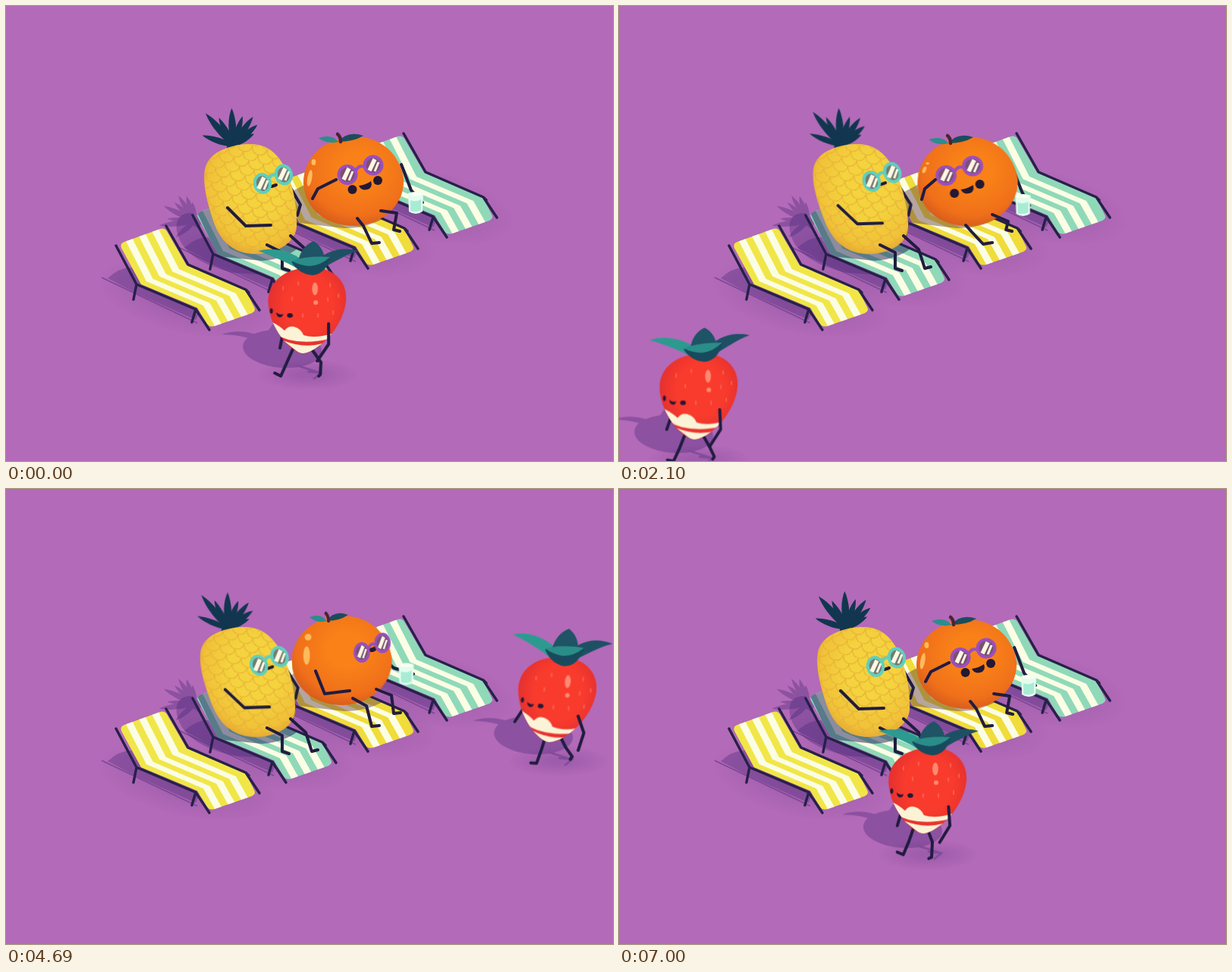
Recreate the animation shown at these times as an HTML page without scripts. Size 800 by 600 pixels, loop 7070 ms.

```html
<!DOCTYPE html>
<html lang="en">
<head>
<meta charset="utf-8">
<title>Fruit on the beach</title>
<style>
html, body { margin: 0; width: 100%; height: 100%; overflow: hidden; background: #b36ab8; }
svg { display: block; width: 100vw; height: 100vh; }
.limb { fill: none; stroke: #211c40; stroke-width: 4; stroke-linecap: round; stroke-linejoin: round; }
.rail { fill: none; stroke: #272049; stroke-width: 3.4; stroke-linecap: round; stroke-linejoin: round; }
.shade { fill: #4a2878; opacity: .36; }

/* everything slow shares one loop */
.loop { animation: 7070ms ease-in-out infinite; }

/* pineapple */
.sway { animation-name: sway; transform-origin: 330px 322px; }
.crown { animation-name: crown; transform-origin: 300px 189px; }
.lift { animation-name: lift; }
@keyframes sway {
  0%, 99%, 100% { transform: skewX(0deg); }
  13.9%, 29.7% { transform: skewX(3.2deg); }
  39.6%, 55.4% { transform: skewX(1.4deg); }
  76.2% { transform: skewX(4.5deg); }
}
@keyframes crown {
  0%, 99%, 100% { transform: rotate(0deg); }
  13.9% { transform: rotate(8deg) scaleY(.93); }
  29.7% { transform: rotate(3deg); }
  39.6% { transform: rotate(0deg) scaleY(1.03); }
  55.4% { transform: rotate(4deg) scaleY(.96); }
  76.2% { transform: rotate(6deg) scaleY(.98); }
}
@keyframes lift {
  0%, 39.6%, 55.4%, 99%, 100% { transform: translateY(0); }
  13.9%, 29.7%, 76.2% { transform: translateY(-2.8px); }
}

/* orange */
.peel { animation-name: peel; }
.stem { animation-name: stem; transform-origin: 441px 176px; }
.gleam { animation-name: gleam; transform-origin: 401px 222px; }
.face { animation-name: face; transform-origin: 473px 236px; }
.specs { animation-name: specs; transform-origin: 467px 216px; }
.cup { animation-name: cup; }
.arm-l { animation-name: armL; }
.arm-r { animation-name: armR; }
.leg-l { animation-name: legL; }
.leg-r { animation-name: legR; }
@keyframes peel {
  0%, 92%, 100% { transform: translate(0, 0); }
  13.9% { transform: translate(-2px, 0); }
  29.7% { transform: translate(1.5px, .5px); }
  39.6% { transform: translate(-6px, -2px); }
  50%, 78% { transform: translate(-15.5px, -5px); }
}
@keyframes stem {
  0%, 92%, 100% { transform: translate(0, 0); }
  13.9% { transform: translate(-5px, 3px); }
  29.7% { transform: translate(-4px, 2px); }
  39.6% { transform: translate(-9px, -2px); }
  50%, 78% { transform: translate(-16px, -5px) scaleX(.86); }
}
@keyframes gleam {
  0%, 92%, 100% { transform: translate(0, 0) scaleX(.75); }
  13.9% { transform: translate(-2px, 0) scale(.5, .8); }
  29.7% { transform: translate(2px, -8px) scale(.6, .4); }
  39.6% { transform: translate(-3px, -4px) scaleX(.9); }
  50%, 78% { transform: translate(-5px, -8px) rotate(-14deg) scale(1.1); }
}
@keyframes face {
  0%, 92%, 100% { transform: translate(0, 0); }
  13.9% { transform: translate(-12px, 4.5px); }
  29.7% { transform: translate(-14.5px, 5px); }
  39.6% { transform: translate(-4px, -10px); }
  50%, 78% { transform: translate(9px, -26px) scale(.76); }
}
@keyframes specs {
  0%, 92%, 100% { transform: translate(0, 0); }
  13.9% { transform: translate(-14px, 2.5px) scaleX(1.04); }
  29.7% { transform: translate(-18.5px, 1px) scaleX(1.03); }
  39.6% { transform: translate(2px, 9.5px); }
  50%, 78% { transform: translate(15.5px, -7px) scaleX(.8); }
}
@keyframes cup {
  0%, 92%, 100% { transform: translate(540px, 260px); }
  13.9% { transform: translate(533.5px, 262px); }
  29.7% { transform: translate(532.5px, 263px); }
  39.6% { transform: translate(534px, 257.5px); }
  50%, 78% { transform: translate(527.5px, 244.5px); }
}
@keyframes armL {
  0%, 92%, 100% { d: path("M404 254L411 241L435 229"); }
  13.9% { d: path("M397 257L402 243L423 230"); }
  29.7% { d: path("M399 255L403 241L417 229"); }
  39.6% { d: path("M399 249L403 256L435 243"); }
  50%, 78% { d: path("M408 240L420 270L453 266"); }
}
@keyframes armR {
  0%, 92%, 100% { d: path("M521 209L534 243L549 259"); }
  13.9% { d: path("M517 211L531 246L543 262"); }
  29.7% { d: path("M518 212L531 245L541 263"); }
  39.6% { d: path("M514 206L523 238L543 253"); }
  50%, 78% { d: path("M500 226L511 236L537 244"); }
}
@keyframes legL {
  0%, 92%, 100% { d: path("M463 280L471 290L482 313L492 312"); }
  13.9%, 29.7% { d: path("M457 289L465 298L480 314L492 312"); }
  39.6% { d: path("M457 282L469 292L482 314L492 312"); }
  50%, 78% { d: path("M457 276L475 286L482 313L492 312"); }
}
@keyframes legR {
  0%, 92%, 100% { d: path("M494 270L515 273L511 295L519 297"); }
  13.9%, 29.7% { d: path("M492 275L513 284L510 295L518 297"); }
  39.6% { d: path("M494 267L512 275L511 296L519 296"); }
  50%, 78% { d: path("M488 264L508 272L511 296L520 295"); }
}

/* strawberry: a straight stroll across the stage, seven strides to a loop */
.stroll { animation: stroll 7070ms steps(101) -3710ms infinite; }
@keyframes stroll {
  from { transform: translate(913px, 191.5px); }
  to { transform: translate(-70px, 569.7px); }
}
.stride { animation: 1010ms linear infinite; }
.back { animation-delay: -505ms; }
.bob { animation-name: bob; }
.turn { animation-name: turn; }
.leaves { animation-name: leaves; transform-origin: 5px -50px; }
.leg { animation-name: leg; }
.near { animation-name: near; }
.far { animation-name: far; }
@keyframes bob {
  0%, 100% { transform: translate(0, 0) rotate(0deg); }
  10% { transform: translate(0, 1.5px) rotate(0deg); }
  28% { transform: translate(-2px, -5px) rotate(11deg); }
  35% { transform: translate(-2.5px, -5px) rotate(12deg); }
  50% { transform: translate(0, 0) rotate(3deg); }
  62% { transform: translate(-1px, 3px) rotate(5deg); }
  77% { transform: translate(-3px, 8px) rotate(4deg); }
  90% { transform: translate(0, 0) rotate(0deg); }
}
@keyframes turn {
  0%, 92%, 100% { transform: translate(0, 0); }
  34% { transform: translate(9px, 7px); }
  52% { transform: translate(3px, 2px); }
  77% { transform: translate(2px, 5px); }
}
@keyframes leaves {
  0%, 92%, 100% { transform: rotate(0deg); }
  34% { transform: translate(4px, 3px) rotate(-12deg); }
  55% { transform: rotate(-2deg); }
  77% { transform: rotate(4deg) scaleY(1.25); }
}
@keyframes leg {
  0%, 100% { d: path("M-18 60L-27 80L-35 98L-43 94"); }
  10% { d: path("M-17 60L-25 81L-33 98L-41 97"); }
  34% { d: path("M-10 56L-10 78L-11 104L-17 105"); }
  50% { d: path("M4 60L18 80L17 96L15 98"); }
  62% { d: path("M2 58L12 78L22 90L20 94"); }
  84% { d: path("M-20 58L-11 77L-13 92L-20 92"); }
  90% { d: path("M-18 58L-24 78L-31 95L-39 92"); }
}
@keyframes near {
  0%, 100% { d: path("M28 29L28 56L13 78"); }
  34% { d: path("M26 33L31 56L19 79"); }
  52% { d: path("M26 32L35 56L30 80"); }
  77% { d: path("M26 42L32 62L22 84"); }
}
@keyframes far {
  0%, 100% { d: path("M-28 30L-33 46L-36 61"); }
  34% { d: path("M-38 8L-49 21L-63 40"); }
  52% { d: path("M-38 8L-52 22L-65 38"); }
  77% { d: path("M-34 20L-42 34L-50 50"); }
}
</style>
</head>
<body>
<svg viewBox="0 0 800 600" preserveAspectRatio="none">
<defs>
  <radialGradient id="gold" cx=".58" cy=".38" r=".68">
    <stop offset=".4" stop-color="#f4d33e"/><stop offset=".8" stop-color="#f0c139"/><stop offset="1" stop-color="#e39c2d"/>
  </radialGradient>
  <radialGradient id="citrus" cx=".55" cy=".38" r=".66">
    <stop offset=".3" stop-color="#f98118"/><stop offset=".75" stop-color="#f0701a"/><stop offset="1" stop-color="#d4591d"/>
  </radialGradient>
  <radialGradient id="red" cx=".52" cy=".42" r=".62">
    <stop offset=".5" stop-color="#f93b2d"/><stop offset="1" stop-color="#dc2c30"/>
  </radialGradient>
  <radialGradient id="soft">
    <stop offset=".2" stop-color="#70408f" stop-opacity=".3"/><stop offset="1" stop-color="#70408f" stop-opacity="0"/>
  </radialGradient>
  <pattern id="scales" width="20" height="20" patternUnits="userSpaceOnUse" patternTransform="rotate(14)">
    <path d="M0 0Q1 10 10 10Q19 10 20 0M-10 10Q-9 20 0 20Q9 20 10 10Q11 20 20 20Q29 20 30 10" fill="none" stroke="#e8b135" stroke-width="1.1"/>
  </pattern>

  <!-- lounger cloth: one bent strip, repeated sideways -->
  <path id="cloth" d="M156 311L203 294Q209 292 212 297L238 342L311 372Q316 374 318 379L327 397Q330 402 324 405L275 422Q268 424 265 419L252 398L178 367L152 319Q150 313 156 311Z"/>
  <clipPath id="clothClip"><use href="#cloth"/></clipPath>
  <path id="stripe" d="M158 310l27 53 75 32 18 32 8.6-3.2-18-32-75-32-27-53z"/>
  <g id="stripes" clip-path="url(#clothClip)" fill="#fbfde4">
    <use href="#stripe"/>
    <use href="#stripe" x="17.2" y="-6.4"/>
    <use href="#stripe" x="34.4" y="-12.8"/>
  </g>
  <g id="ground">
    <ellipse cx="240" cy="385" rx="120" ry="48" fill="url(#soft)" transform="rotate(12 240 385)"/>
    <path class="shade" d="M134 359Q150 344 166 345L178 364L256 400L250 414L172 379Z"/>
    <path d="M126 358L252 418" stroke="#7d4796" stroke-width="1.6"/>
  </g>
  <g id="frame" class="rail">
    <path d="M145 316L172 367L250 400L268 427M172 367L168 387M250 400L245 417"/>
    <path d="M211 290L240 341L316 374L334 401M316 374L320 378"/>
  </g>

  <path id="blade" d="M-2 0C-8-18-6-40 0-52C5-40 7-18 2 0Z"/>
  <g id="tuft">
    <path d="M-10 4Q-7-8-11-16L11-16Q7-8 9 3Z"/>
    <g transform="translate(0 -6)">
      <use href="#blade" transform="rotate(-72) scale(.75 .83)"/>
      <use href="#blade" transform="rotate(-41) scale(.9 1.08)"/>
      <use href="#blade" transform="rotate(-28) scale(.75 .8)"/>
      <use href="#blade" transform="rotate(-3) scale(.95)"/>
      <use href="#blade" transform="rotate(17) scale(.75 .78)"/>
      <use href="#blade" transform="rotate(34) scale(.8 .88)"/>
      <use href="#blade" transform="rotate(49) scale(.8)"/>
      <use href="#blade" transform="rotate(60) scale(.7 .6)"/>
    </g>
  </g>
  <path id="pine" d="M320 182C345 181 360 196 370 218C380 242 384 270 383 292C380 316 352 327 328 327C300 326 283 312 273 283C265 258 259 236 262 216C266 194 292 183 320 182Z"/>
  <g id="glint" fill="none" stroke="#fff8e4"><path d="M-5 7L2-8" stroke-width="5.4"/><path d="M2 8L7-4" stroke-width="3"/></g>

  <path id="berry" d="M0-45C30-48 53-30 51-2C49 28 20 64-5 68C-20 68-46 40-51 8C-56-24-32-43 0-45Z"/>
  <clipPath id="berryClip"><use href="#berry"/></clipPath>
  <path id="seed" d="M0-2V2" stroke="#fc6350" stroke-width="1.8" stroke-linecap="round"/>
</defs>

<rect width="800" height="600" fill="#b36ab8"/>

<!-- shadows on the sand -->
<use href="#ground" x="313" y="-122"/>
<use href="#ground" x="209" y="-81"/>
<use href="#ground" x="101" y="-40"/>
<use href="#ground"/>
<path class="shade" d="M225 296Q222 272 246 273L272 327L336 354L300 352Q232 336 225 296Z"/>
<use href="#tuft" class="shade" transform="translate(254 286) rotate(-62) scale(.75 .92)"/>

<!-- loungers, far to near -->
<g transform="translate(313 -122)"><use href="#cloth" fill="#8fd9b9"/><use href="#stripes"/><use href="#frame"/></g>
<g transform="translate(209 -81)"><use href="#cloth" fill="#f0dc3a"/><use href="#stripes"/>
  <path clip-path="url(#clothClip)" fill="#552c40" opacity=".42" d="M160 330L215 300L296 356Q272 374 236 374L178 367Z"/><use href="#frame"/></g>
<g transform="translate(101 -40)"><use href="#cloth" fill="#8fd9b9"/><use href="#stripes"/>
  <path clip-path="url(#clothClip)" fill="#26285f" opacity=".52" d="M145 300L215 285L288 356Q268 374 236 376L178 370Z"/><use href="#frame"/></g>
<use href="#cloth" fill="#f1e648"/><use href="#stripes"/><use href="#frame"/>

<!-- orange -->
<g>
  <path class="limb loop arm-r" d="M521 209L534 243L549 259"/>
  <g class="loop peel">
    <path fill="url(#citrus)" d="M452 173C490 168 520 194 524 228C526 262 496 289 460 290C422 290 394 268 392 234C392 200 418 176 452 173Z"/>
  </g>
  <g class="loop stem">
    <path fill="#2b8d8c" d="M438 179Q430 168 412 174Q424 183 438 179Z"/>
    <path fill="#1c4c5c" d="M438 179Q450 164 471 171Q458 179 438 179Z"/>
    <path d="M441 179Q441 172 437 169" fill="none" stroke="#4b2433" stroke-width="4.5" stroke-linecap="round"/>
  </g>
  <g class="loop gleam" fill="#fdbb5c">
    <ellipse cx="400" cy="227" rx="4" ry="11" transform="rotate(14 400 227)"/><circle cx="407" cy="206" r="4"/>
  </g>
  <g class="loop face" fill="#241833">
    <circle cx="456.5" cy="242" r="6"/><circle cx="490" cy="230" r="6"/>
    <path d="M465 237Q474 236 481 231Q484 240 476 242Q468 244 465 237Z"/>
  </g>
  <g class="loop specs">
    <g fill="#79506f" stroke="#9a4fbd" stroke-width="4">
      <path d="M461 217Q466 208 474 213" fill="none"/>
      <circle cx="450" cy="222.5" r="11.5"/><circle cx="484" cy="210" r="11.5"/>
    </g>
    <use href="#glint" x="450" y="222"/><use href="#glint" x="484" y="210"/>
  </g>
  <path class="limb loop leg-l" d="M463 280L471 290L482 313L492 312"/>
  <path class="limb loop leg-r" d="M494 270L515 273L511 295L519 297"/>
  <path class="limb loop arm-l" d="M404 254L411 241L435 229"/>
  <g class="loop cup">
    <path fill="#e4fcee" d="M-10-13Q0-17 10-13L9 11Q0 17-9 11Z"/>
    <path fill="#a9ecd5" d="M-7-4Q0-1 7-5L7 9Q0 13-7 10Z"/>
    <ellipse cy="-12" rx="9" ry="2.5" fill="#fafff0"/>
  </g>
</g>

<!-- pineapple -->
<g>
  <g class="loop sway">
    <path class="limb" d="M374 238L388 262L384 276"/>
    <g class="loop crown"><use href="#tuft" x="300" y="190" fill="#12364f"/></g>
    <use href="#pine" fill="url(#gold)"/>
    <use href="#pine" fill="url(#scales)"/>
    <g class="loop lift">
      <path d="M350 238L356 236" stroke="#241833" stroke-width="4" stroke-linecap="round"/>
      <g fill="#747b70" stroke="#5fcfbd" stroke-width="4">
        <path d="M347 227Q351 220 357 224" fill="none"/>
        <ellipse cx="338" cy="234" rx="10" ry="12" transform="rotate(-14 338 234)"/>
        <ellipse cx="366" cy="222.5" rx="10" ry="12" transform="rotate(-14 366 222.5)"/>
      </g>
      <use href="#glint" x="338" y="234"/><use href="#glint" x="366" y="222"/>
      <path class="limb" d="M292 266L316 290L349 289"/>
    </g>
  </g>
  <path class="limb" d="M344 315L364 325L364 346L373 349M375 303L395 321L403 346L411 344"/>
</g>

<!-- strawberry -->
<g class="stroll">
  <ellipse cx="0" cy="96" rx="66" ry="20" fill="url(#soft)"/>
  <g class="shade">
    <ellipse cx="-33" cy="62" rx="52" ry="25" transform="rotate(4 -33 62)"/>
    <path d="M-113 43Q-86 34-58 47L-62 58Q-74 44-113 43ZM-52 40Q-44 22-26 20L-22 44Z"/>
  </g>
  <path d="M-14 84L18 94L8 102M0 92L18 94" fill="none" stroke="#824a9a" stroke-width="2.5"/>
  <path class="limb stride far" d="M-28 30L-33 46L-36 61"/>
  <path class="limb stride leg back" d="M4 60L18 80L17 96L15 98"/>
  <path class="limb stride leg" d="M-18 60L-27 80L-35 98L-43 94"/>
  <g class="stride bob">
    <use href="#berry" fill="url(#red)"/>
    <g clip-path="url(#berryClip)">
      <g class="stride turn">
        <use href="#seed" x="-32" y="-18"/><use href="#seed" x="-12" y="-24"/><use href="#seed" x="30" y="-22"/>
        <use href="#seed" x="-20" y="-4"/><use href="#seed" x="27" y="-3"/><use href="#seed" x="41" y="-8"/>
        <use href="#seed" x="-6" y="18"/><use href="#seed" x="14" y="18"/><use href="#seed" x="34" y="14"/>
        <path fill="#fbf3d6" d="M-60 20Q-38 30-30 38Q-25 31-17 33Q-8 36-5 44Q10 49 32 42L28 49Q0 56-25 50Q-44 44-60 30ZM-32 51Q-5 62 20 55L-5 72Z"/>
        <ellipse cx="10" cy="-17" rx="3.8" ry="8.5" fill="#ff8a70"/><circle cx="11" cy="1" r="3" fill="#ff8a70"/>
        <g fill="#241833">
          <ellipse cx="-47.5" cy="12" rx="2" ry="3.5"/><ellipse cx="-23" cy="18" rx="3.8" ry="3"/>
          <path d="M-41 14Q-37 18-32 16Q-33 21-37 20.500Q-41 19-41 14Z"/>
        </g>
      </g>
    </g>
    <g class="stride leaves">
      <path fill="#1e5064" d="M8-50C25-68 45-73 67-67C50-62 35-52 16-42Z"/>
      <path fill="#2d9a90" d="M2-48C-14-64-40-74-65-67C-50-62-30-54-10-42Z"/>
      <path fill="#1f5366" d="M-12-54Q-8-73 8-80Q22-72 23-54Z"/>
      <path fill="#184a5d" d="M-21-53Q2-60 30-58Q24-36 6-35Q-12-37-21-53Z"/>
      <path fill="#2a8d87" d="M-21-54Q2-61 30-59Q18-48 3-47Q-10-48-21-54Z"/>
    </g>
  </g>
  <path class="limb stride near" d="M28 29L28 56L13 78"/>
</g>
</svg>
</body>
</html>
```
